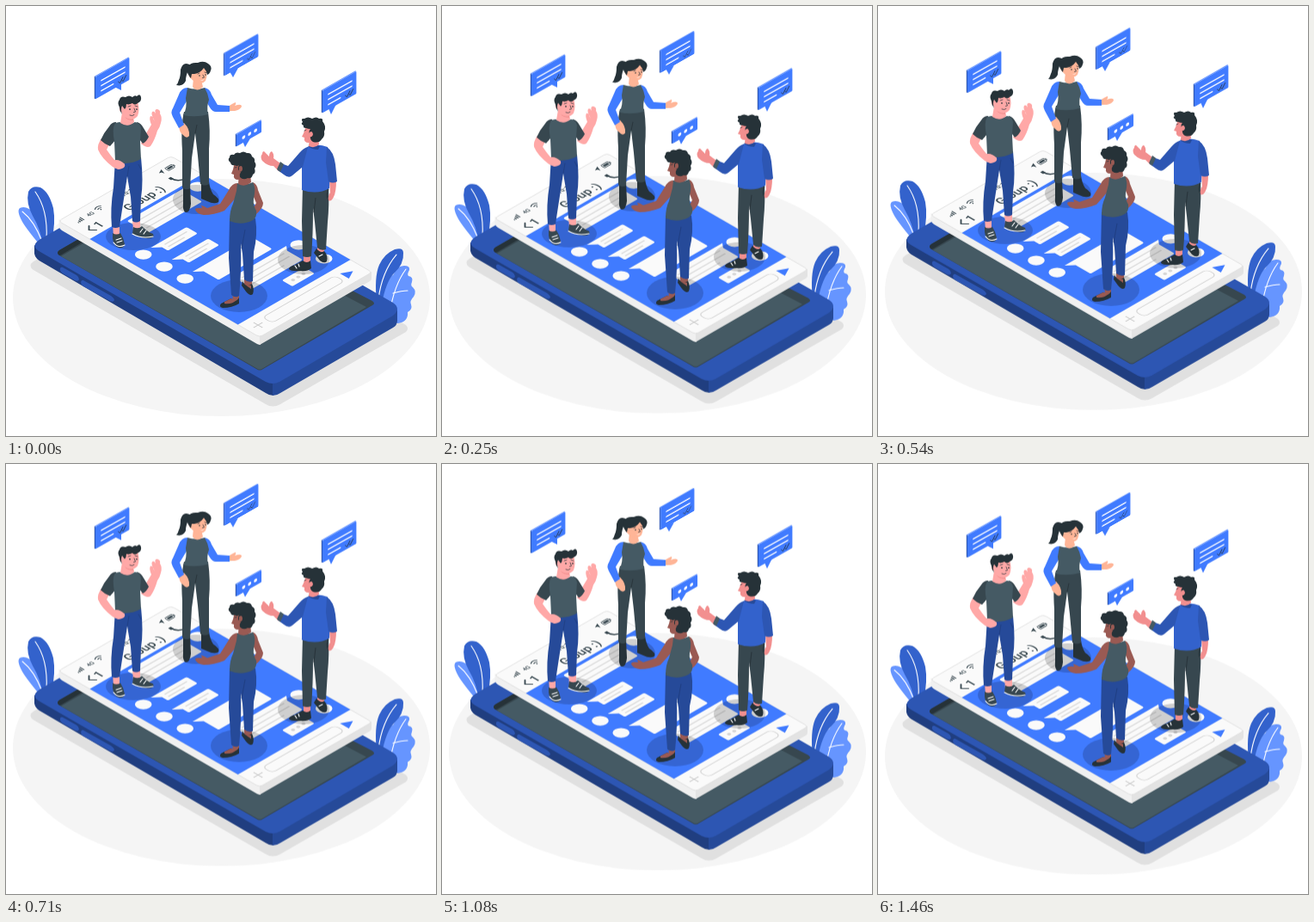
An HTML page for the animation above (1500 ms loop, 500x500 px).

```html
<!DOCTYPE html>
<html lang="en">
<head>
<meta charset="utf-8">
<title>Group chat</title>
<style>
html, body { margin: 0; width: 100%; height: 100%; overflow: hidden; background: #fff; }
svg { display: block; width: 100vw; height: 100vh; }
/* the loop opens one step into the lift */
#scene { animation: float 1.5s -.048s infinite; }
@keyframes float {
  0%, 100% { transform: translateY(.6px); animation-timing-function: steps(18, end); }
  50% { transform: translateY(-9.4px); animation-timing-function: steps(18, end); }
}
.blue { fill: #407bff; }
.mid { fill: #3362cc; }
.deep { fill: #2d56b3; }
.navy { fill: #264a99; }
.dusk { fill: #203e80; }
.light { fill: #6695ff; }
.grey { fill: #455a64; }
.slate { fill: #37474f; }
.ink { fill: #263238; }
.white { fill: #fafafa; }
.pink { fill: #ffa8a7; }
.peach { fill: #ffb597; }
.rose { fill: #f28f8f; }
.brown { fill: #9a5a53; }
.shade { fill: #000; opacity: .17; }
.line { fill: none; stroke: #37474f; stroke-width: 1.5; stroke-linecap: round; stroke-linejoin: round; }
.thin { fill: none; stroke: #263238; stroke-width: .7; stroke-linecap: round; stroke-linejoin: round; }
.pale { fill: none; stroke: #fff; stroke-width: 1.1; stroke-linecap: round; }
.row { fill: none; stroke: #dcdcdc; stroke-width: 1.6; }
text { font-family: Roboto, Arial, sans-serif; fill: #37474f; font-weight: 500; }
</style>
</head>
<body>
<svg viewBox="0 0 500 500">
<defs>
  <g id="panel">
    <path class="deep" d="M0 0L-1.200-1.200V24.500L0 26Z"/>
    <path class="light" d="M-1.200-1.200L38.800-1.200L40 0H0Z"/>
    <rect class="blue" width="40" height="26" rx="1"/>
    <path d="M7 8.200H34.500M7 14.200H34.500M7 20.200H21" fill="none" stroke="#fff" stroke-width="1.500" stroke-linecap="round"/>
    <path class="thin" d="M27 21l2 2.500 3.500-5M31.500 22l1.200 1.500 3.500-5"/>
  </g>
</defs>
<g id="scene">
  <ellipse cx="250.500" cy="339" rx="242.500" ry="138" fill="#f5f5f5"/>
  <path d="M32 307Q25 302 32 297L180 212L465 371Q469 375 465 379L319 463Q310 468 302 463Z" fill="#e0e0e0"/>

  <!-- plants -->
  <path class="light" d="M42 281Q25 261 19 251Q12 238 16 235Q24 231 34 242Q43 252 47 273Z"/>
  <path class="pale" d="M19 239Q33 250 42 274"/>
  <path class="mid" d="M43 278Q40 259 31 244Q23 229 26 216Q30 208 40 211Q50 216 55 235Q58 252 53 273Z"/>
  <path class="pale" d="M34 216Q49 237 47 271"/>
  <path class="light" d="M439 354Q435 336 440 324Q443 316 447 313Q450 315 452 309Q454 303 463 302Q470 302 469 307Q466 312 468 314Q474 315 472 321Q470 325 473 327Q478 332 474 338Q469 343 471 347Q473 353 467 356Q468 367 456 369L447 367Z"/>
  <path class="pale" d="M465 306Q451 325 446 358M450 334Q460 331 467 331"/>
  <path class="mid" d="M431 345Q428 315 434 301Q440 288 452 283Q462 280 462 287Q463 300 451 311Q442 320 437 346Z"/>
  <path class="pale" d="M454 289Q437 309 433 341"/>

  <!-- phone -->
  <path class="dusk" d="M33 278V288Q34 294 42 298L302 450Q306 453 311 453V432Z"/>
  <path class="navy" d="M310 432V453Q315 453 319 450L450 374Q455 371 455 366V353Z"/>
  <path class="deep" d="M40 286Q27 279 40 271L180 190L450 345Q460 352 450 360L318 437Q310 441 302 437Z"/>
  <path class="slate" d="M62 290Q58 287 62 284L180 216L426 343Q430 346 426 348L299 422Q295 425 291 422Z"/>
  <path class="ink" d="M62 290Q58 287 62 284L100 262V268L64 289.500Z"/>
  <path class="grey" d="M64 291L180 224L419 350L299 421Q295 424 291 421Z"/>
  <path class="deep" d="M66 304L82 313Q85 315 85 318Q84 321 80 319L66 311Q62 308 63 305Q64 303 66 304ZM90 319L122 337Q126 340 126 342Q125 345 121 343L90 326Q87 324 87 321Q88 318 90 319Z"/>

  <!-- floating screen -->
  <path d="M61.500 248V256Q62 259 65 261L292 393Q294 394 296 394V382Z" fill="#f0f0f0"/>
  <path d="M295 382V394L423 320Q425 319 425 317V309Z" fill="#e3e3e3"/>
  <g transform="matrix(.866 -.5 .866 .5 61 250)">
    <rect class="white" width="151" height="270" rx="4" stroke="#e0e0e0" stroke-width=".8"/>
    <rect class="blue" y="42" width="151" height="199"/>
    <path class="slate" d="M11 14.500h1.300v1.500h-1.300zM13.300 13h1.300v3h-1.300zM15.600 11.500h1.300v4.500h-1.300zM17.900 10h1.300v6h-1.300z"/>
    <text x="25.500" y="15.500" font-size="6.500">4G</text>
    <path class="line" d="M38 11q4-3.500 8 0M39.800 13.200q2.200-2 4.400 0" style="stroke-width:1"/>
    <circle class="slate" cx="42" cy="15" r=".8"/>
    <text x="81" y="15.500" font-size="7" text-anchor="middle">10:15</text>
    <path class="slate" d="M123 12l6-3-2.500 7-.800-3.200z"/>
    <rect x="132.500" y="10" width="9" height="5.500" rx="1" fill="none" stroke="#37474f" stroke-width=".8"/>
    <path class="slate" d="M133.800 11.300h6.400v2.900h-6.400zM142 11.500h1v2.500h-1z"/>
    <path class="line" d="M15 26l-5 5 5 5"/>
    <text x="19" y="36" font-size="14">1</text>
    <text x="84" y="36" font-size="14" text-anchor="middle">Group :)</text>
    <path d="M125 25q0 10 10 11" fill="none" stroke="#37474f" stroke-width="2"/>
    <path d="M125 24v4M132 36h4" stroke="#37474f" stroke-width="3.400"/>

    <g class="white">
      <circle cx="18" cy="96" r="8"/><circle cx="18" cy="124" r="8"/><circle cx="18" cy="152" r="8"/>
      <circle cx="133.500" cy="53.500" r="8"/><circle cx="133.500" cy="189" r="8"/><circle cx="134.500" cy="222" r="8"/>
      <path d="M48 46H124L119 52V72Q119 74 117 74H48Q46 74 46 72V48Q46 46 48 46Z"/>
      <path d="M31 93H77Q79 93 79 95V106Q79 108 77 108H41Q39 108 39 106V100Z"/>
      <path d="M31 121H78Q80 121 80 123V134Q80 136 78 136H41Q39 136 39 134V128Z"/>
      <path d="M31 149H109Q111 149 111 151V174Q111 176 109 176H41Q39 176 39 174V156Z"/>
      <path d="M54 182H124L119 188V207Q119 209 117 209H54Q52 209 52 207V184Q52 182 54 182Z"/>
      <path d="M83 219H119L111 225V231Q111 233 109 233H83Q81 233 81 231V221Q81 219 83 219Z"/>
    </g>
    <path class="row" d="M51 53H114M51 60H114M51 67H100M44 98.500H74M44 103.500H66M44 126.500H75M44 131.500H68M57 189H114M57 196H114M57 203H100"/>
    <g fill="#d5d5d5"><circle cx="89" cy="226" r="2"/><circle cx="96" cy="226" r="2"/><circle cx="103" cy="226" r="2"/></g>
    <path d="M13 249V261M7 255H19" fill="none" stroke="#c9c9c9" stroke-width="1.200"/>
    <rect x="25" y="249" width="97" height="13" rx="5" fill="#fafafa" stroke="#d2d2d2"/>
    <path class="blue" d="M128 250L139.500 256L128 262Z"/>
  </g>

  <g class="shade">
    <ellipse cx="148" cy="268" rx="32" ry="16"/>
    <ellipse cx="221" cy="225" rx="27" ry="17"/>
    <ellipse cx="271" cy="337" rx="33" ry="19"/>
    <ellipse cx="346" cy="295" rx="30" ry="17"/>
  </g>

  <!-- waving man -->
  <path class="pink" d="M124 252H132V269H125ZM147 246H156V262H148Z"/>
  <path class="slate" d="M124 264Q128 267 133 264Q137 270 138 277Q137 282 131 281Q125 279 124 270ZM148 257Q154 260 158 256Q165 263 171 265Q173 269 168 270Q158 271 147 265Z"/>
  <path class="pale" d="M128 272l6-2M129 275l6-2M156 263l3-4M160 265l3-4M125 275Q130 282 138 278M147 265Q157 271 171 268"/>
  <path class="navy" d="M127 178L157 176Q160 205 157 223L156 250Q151 253 147 250L145 222L141 198L137 224Q134 243 132 257Q127 259 123 257Q121 235 125 211Z"/>
  <path d="M141 198L143 186M157 190l-3-6" fill="none" stroke="#203e80" stroke-width=".8"/>
  <path class="pink" d="M111 154Q106 161 107 167Q111 177 124 187Q131 192 137 188Q140 185 135 180L126 179Q121 173 117 167L122 157Z"/>
  <path class="pink" d="M160 153L169 138Q166 131 168 128Q171 128 171 131L173 134Q168 126 170 123Q172 121 174 125Q172 120 176 120Q180 121 179 125Q182 130 180 136Q179 141 176 145Q173 156 168 163Q164 166 157 160Z"/>
  <path class="slate" d="M128 135Q123 135 120 140Q114 147 110 156Q115 161 121 163L128 155ZM152 135Q157 136 160 142L166 152Q164 157 159 160L153 152Z"/>
  <path class="grey" d="M132 135Q142 140 150 135Q156 136 157 142L156 158L157 178Q142 186 127 181L126 158Q123 142 127 136Z"/>
  <path class="pink" d="M135 124L133 136Q142 142 149 135L148 129Z"/>
  <path class="rose" d="M138 129Q143 132 148 131V133Q141 133 138 129Z"/>
  <path class="pink" d="M136 111H153Q156 120 153 128Q149 133 142 131Q137 129 135 124Q131 122 132 117Q134 115 136 117Z"/>
  <path class="ink" d="M135 126Q132 122 132 118Q129 112 132 109Q133 104 139 106Q143 103 147 106Q150 103 152 105Q156 101 157 106Q158 111 153 113Q150 116 147 113Q143 115 140 114Q140 118 138 120L135 116Q133 120 135 126Z"/>
  <path class="thin" d="M142 117l3-1M150 116l3 1M149 119l1.500 4-2 .500M144 127q3 1.500 5-.500"/>
  <circle class="ink" cx="144" cy="120" r=".9"/><circle class="ink" cx="152" cy="120" r=".9"/>
  <path class="pink" d="M122 181Q130 176 138 184Q137 189 130 190Z"/>

  <!-- woman with ponytail -->
  <path class="ink" d="M215 69Q206 63 203 74Q203 82 201 86Q200 90 198 92Q206 94 209 87Q209 80 213 73Z"/>
  <path class="ink" d="M206 209H214L215 230Q214 240 209 240Q205 238 206 229ZM227 204L236 204Q237 213 241 219Q249 224 247 228Q242 231 234 227L227 224Z"/>
  <path class="slate" d="M207 123H235Q238 145 236 166L236 207Q231 210 226 207L223 174L220 148L216 177L214 212Q209 215 205 211L205 168Q203 139 207 123Z"/>
  <path d="M220 148L222 138" fill="none" stroke="#263238" stroke-width=".8"/>
  <path class="peach" d="M201 138L207 136Q214 143 213 151Q210 155 206 150Q201 147 201 138ZM258 117Q264 113 267 112Q268 114 266 116Q274 113 274 117Q272 121 266 122L258 122Z"/>
  <path class="blue" d="M211 95Q204 95 201 103L194 119Q191 123 194 129L201 142L207 138L202 124L211 109Z"/>
  <path class="blue" d="M231 95Q237 96 239 103L246 115L260 116V123L244 123Q240 123 237 118L230 106Z"/>
  <path class="grey" d="M211 95Q221 98 231 95Q235 102 236 109Q233 117 235 126Q221 130 206 127Q211 119 209 107Z"/>
  <path class="peach" d="M218 84L217 94Q222 101 229 94L227 86Z"/>
  <path class="peach" d="M215 72H232Q235 80 232 87Q228 92 221 89Q216 86 213 82Q211 77 215 77Z"/>
  <path class="ink" d="M214 83Q208 75 212 70Q215 65 223 66Q230 63 235 67Q240 70 238 75Q237 79 234 80Q233 75 230 72Q226 78 219 79L216 79L215 84Z"/>
  <path class="thin" d="M223 79l2-1M231 77l2 .500M229 80l1.500 3-2 .500"/>
  <circle class="ink" cx="225" cy="81" r=".8"/><circle class="ink" cx="232" cy="80" r=".8"/>
  <path d="M225 85.500q3 1.500 5.500-.500q-2 3-5.500 .500" fill="#fff"/>

  <!-- man in sweater -->
  <path class="rose" d="M346 286H354V299H346ZM362 276H370V289H362Z"/>
  <path class="ink" d="M345 296Q350 300 354 296L355 305Q350 309 343 308Q332 309 329 306Q329 303 336 301ZM361 282Q366 288 370 285Q375 291 373 297Q370 300 365 296L358 287Z"/>
  <path class="pale" d="M336 302l2 3M340 300l1 3M364 291l4-2"/>
  <path class="slate" d="M345 209L375 208Q376 232 374 251L372 283Q366 285 362 281L359 251L357 235Q357 267 355 291Q350 293 345 291L344 250Z"/>
  <path d="M358 240L360 223M375 213Q371 220 375 226" fill="none" stroke="#263238" stroke-width=".9"/>
  <path class="rose" d="M319 183L311 177Q312 172 309 169Q306 170 306 175L300 169Q298 169 298 172Q295 175 298 180Q304 186 311 186L317 192ZM376 202L384 203Q384 216 381 222Q378 228 375 226Q374 221 377 217Z"/>
  <path class="mid" d="M350 164Q362 159 374 164L377 180L376 212Q362 220 344 214L344 180Z"/>
  <path class="deep" d="M351 164Q346 165 341 171L328 186L320 183L316 191L323 196Q329 201 333 197L345 187ZM373 164Q381 169 383 184L385 204Q380 207 375 204L372 182Z"/>
  <path class="grey" d="M319 181L323 184L319 193L315 190Z"/>
  <path class="navy" d="M351 163Q357 160 365 163L363 167Q356 167 351 163Z"/>
  <path class="rose" d="M353 150L352 163Q359 166 364 161L363 149Z"/>
  <path class="rose" d="M349 139L346 148L344 152L347 153Q346 159 352 159Q360 157 362 149L360 139Z"/>
  <path class="ink" d="M349 142Q345 142 346 139Q342 137 345 135Q342 130 347 131Q351 128 356 131Q361 128 364 131Q369 130 368 134Q373 140 370 146Q371 152 367 155Q364 160 357 158Q353 156 354 150Q351 146 354 143Q351 143 349 142Z"/>
  <path class="rose" d="M353 147Q356 144 357 149Q356 153 353 152Z"/>
  <path class="thin" d="M347 145l2-1"/>

  <!-- woman in front -->
  <path class="brown" d="M263 328H271V344H264ZM277 312H286V327H277Z"/>
  <path class="ink" d="M262 340Q267 346 271 339L271 346Q263 351 252 351Q247 350 250 346ZM275 320Q279 328 286 323Q289 329 287 335Q284 338 279 332L274 325Z"/>
  <path class="brown" d="M254 344L262 340L268 342Q263 347 254 346ZM278 324L285 325V329Z"/>
  <path class="navy" d="M260 247H290Q293 266 288 286L287 320Q282 322 277 318L275 288L273 276Q274 310 271 337Q267 340 262 336L259 293Z"/>
  <path d="M274 282L278 260" fill="none" stroke="#203e80" stroke-width=".9"/>
  <path class="brown" d="M287 205Q292 207 293 214L299 229Q299 235 291 242L284 242L291 229L285 215Z"/>
  <path class="brown" d="M269 206Q263 206 259 214L249 230L234 235Q229 232 227 232L228 235Q220 234 220 237Q222 242 230 243Q242 243 254 238L270 220Z"/>
  <path class="grey" d="M269 206Q279 209 287 205Q291 211 288 224Q287 231 291 238Q292 246 287 249Q274 256 260 250Q260 238 264 230L268 215Z"/>
  <path class="brown" d="M271 195L270 207Q278 211 285 205L284 194Z"/>
  <path class="brown" d="M266 181L264 190L262 195L265 196Q264 202 270 202Q278 201 279 192L276 180Z"/>
  <path class="ink" d="M266 185Q262 186 261 182Q257 179 260 176Q260 172 265 173Q267 169 272 171Q276 168 280 171Q285 170 286 175Q290 177 289 181Q292 185 289 189Q291 194 287 196Q286 201 281 200Q276 203 272 199Q271 196 273 193Q268 190 271 185Q268 187 266 185Z"/>
  <path class="brown" d="M271 187Q275 184 275 190Q274 194 271 192Z"/>
  <path class="thin" d="M266 188l2-.500"/>

  <!-- chat bubbles -->
  <path class="blue" d="M126 94L134 98L134 90Z"/>
  <use href="#panel" transform="matrix(.985 -.56 0 1 104 82.300)"/>
  <path class="blue" d="M260 76L264 83L270 72Z"/>
  <use href="#panel" transform="matrix(.985 -.56 0 1 254 55.300)"/>
  <path class="blue" d="M375 119L378 126L384 114Z"/>
  <use href="#panel" transform="matrix(.985 -.56 0 1 368 98.300)"/>
  <path class="blue" d="M275 157L278 164L284 154Z"/>
  <g transform="matrix(.985 -.56 0 1 268 149.300)">
    <path class="deep" d="M0 0L-1.200-1.200V13L0 14Z"/>
    <path class="light" d="M-1.200-1.200H28.500L29.500 0H0Z"/>
    <rect class="blue" width="29.500" height="14" rx="1"/>
    <g fill="#fff"><circle cx="8.500" cy="8" r="1.900"/><circle cx="15.500" cy="8" r="1.900"/><circle cx="22.500" cy="8" r="1.900"/></g>
  </g>
</g>
</svg>
</body>
</html>
```
